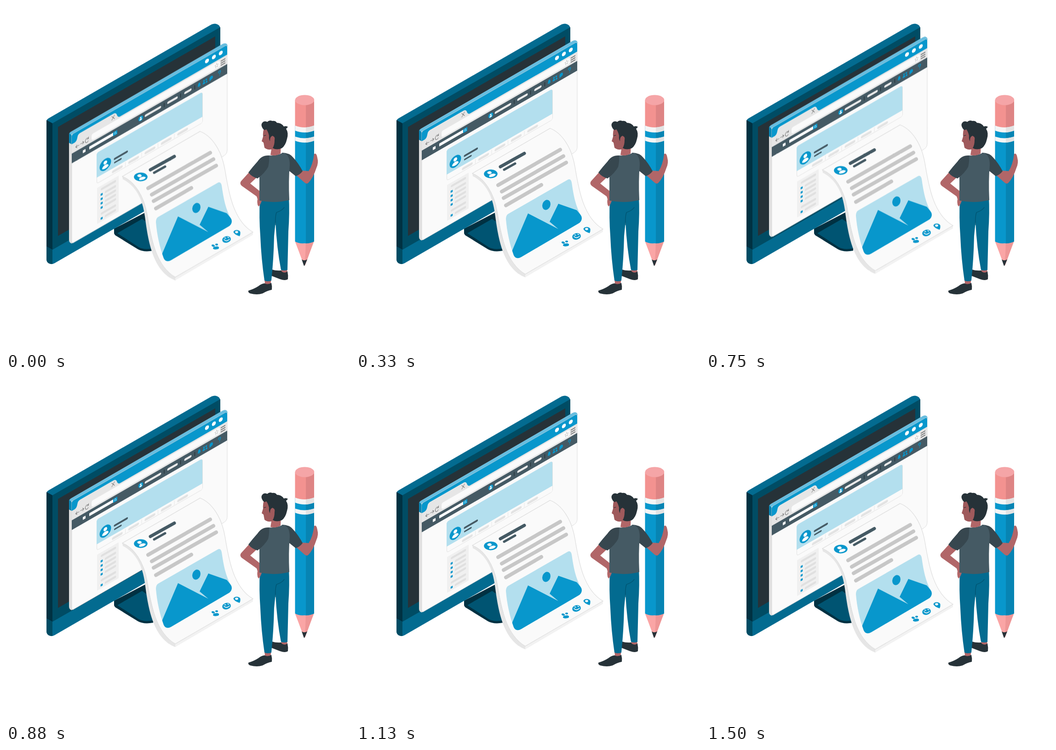
Recreate the animation shown at these times as an HTML page. Size 748 by 748 pixels, loop 1540 ms.

```html
<!DOCTYPE html>
<html lang="en">
<head>
<meta charset="utf-8">
<title>Post editor</title>
<style>
html, body { margin: 0; width: 100%; height: 100%; overflow: hidden; background: #fff; }
svg { display: block; width: 100vw; height: 100vh; }
.float { animation: float 1540ms linear infinite; }
@keyframes float {
  0%, 100% { transform: translateY(-.4px); }
  47.3% { transform: translateY(-15px); }
  96.6% { transform: translateY(0); }
}
.ln { fill: none; stroke-linecap: round; stroke-linejoin: round; }
.blue { fill: #0897cc; }
.sky { fill: #b3dfee; }
.teal { fill: #036b90; }
.ink { fill: #263238; }
.skin { fill: #b16668; }
.shade { fill: #9f5a5c; }
</style>
</head>
<body>
<svg viewBox="0 0 748 748">
  <defs>
    <g id="user">
      <circle class="blue" r="12.5"/>
      <circle cy="-4.2" r="4" fill="#fff"/>
      <path d="M-7 6.5C-7 -1 7 -1 7 6.5Q0 11.5 -7 6.5Z" fill="#fff"/>
    </g>
    <clipPath id="photo">
      <path d="M331 459L460 385Q467 381 469 391C473 418 477 442 490 464Q493 472 486 478.500L359 553Q348 559 343 549C334 524 328 497 326 470Q326 462 331 459Z"/>
    </clipPath>
  </defs>

  <!-- monitor -->
  <g>
    <path d="M235 484V494Q236 498 240 500L287 529Q300 536 320 532V440Z" fill="#003142"/>
    <path d="M242 494L296 463L320 480V527Q300 531 288 524Z" fill="#005472"/>
    <path class="teal" d="M88 250Q89 246 93 244L447 40Q456 36 463 42Q466 45 466 51V351L106 559Q97 564 91 558Q88 555 88 549Z"/>
    <path d="M101 255L466 46V321L101 530Z" fill="#004c64"/>
    <path d="M88 248L101 255V530L88 523Z" fill="#003142"/>
    <path d="M88 523L101 530V561Q88 561 88 550Z" fill="#004c64"/>
    <path class="ink" d="M113 263L455 66V303L113 500Z"/>
  </g>

  <g class="float">
    <!-- window -->
    <path d="M137 281Q137 276 141 274L471 83Q478 79 481 84L481 90L143 285V517Q137 515 137 509Z" fill="#e0e0e0"/>
    <path d="M137 298V280Q137 276 141 274L143 280V301Z" fill="#0784b3"/>
    <path d="M138 277L141 274L470 83.500Q477 79.500 481 84L482 88L143 282Z" fill="#67bddf"/>
    <g transform="matrix(1 -.577 0 1 143 280)">
      <path d="M0 0H334Q338 0 338 6V229Q338 237 330 237H4Q0 237 0 233Z" fill="#fafafa" stroke="#dcdcdc"/>
      <path class="blue" d="M0 22V4Q0 0 4 0H334Q338 0 338 6V22Z"/>
      <path d="M0 42V21H7Q11 20 12 14Q13 7 18 7H91Q96 7 98 13Q100 21 105 21H338V42Z" fill="#e6e6e6"/>
      <g fill="#fff">
        <circle cx="294" cy="9.500" r="4.300"/><circle cx="309" cy="9.500" r="4.300"/><circle cx="324" cy="9.500" r="4.300"/>
        <rect x="43" y="24" width="279" height="14" rx="4" fill="#fafafa"/>
      </g>
      <g class="ln" stroke="#757575" stroke-width="1">
        <path d="M87 11L93 19M93 11L87 19M16 32H8.500M11.500 29L8.500 32L11.500 35M19 31.500H26.500M23.500 28.500L26.500 31.500L23.500 34.500"/>
        <path d="M36 29A3.600 4.600 0 1 0 36 34M36.500 26V29.500H33"/>
        <path d="M324 27.500H334M324 32H334M324 36.500H334" stroke-width="2" stroke-linecap="butt"/>
        <path d="M315 26.500L316.200 30H319L316.800 32L317.600 35.500L315 33.500L312.400 35.500L313.200 32L311 30H313.800Z" stroke="#c4c4c4" stroke-width=".8"/>
      </g>

      <rect y="41.500" width="338" height="21" fill="#455a64"/>
      <rect x="24" y="48.500" width="6" height="6" rx=".6" fill="#fff"/>
      <rect x="38" y="48" width="53" height="6.500" rx="1" fill="#fff"/>
      <rect class="blue" x="90" y="47" width="9" height="8.500" rx="1"/>
      <path class="ln" d="M93 51A1.600 1.600 0 1 1 96 51A1.600 1.600 0 1 1 93 51M96 52L97 53.500" stroke="#cbe8f3" stroke-width=".8"/>
      <use href="#user" transform="translate(150 51.500) scale(.42)"/>
      <path class="ln" d="M161 51.500H192M210 51.500H228M247 51.500H258" stroke="#ebebeb" stroke-width="5"/>
      <path d="M201 47V56M236.500 47V56M267.500 47V56" stroke="#263238" stroke-width="1.300"/>
      <g class="blue">
        <path d="M277 46.500Q280 48 279.500 52L280.500 54.500H273.500L274.500 52Q274 48 277 46.500ZM276 55H278.500L277 57Z"/>
        <circle cx="287.500" cy="49" r="1.900"/><circle cx="292.500" cy="49" r="1.900"/>
        <path d="M284.500 55Q285 51 288 51.500Q290.500 52 290 56H285ZM291 56Q291 51.500 293.500 52Q295.500 53 295 56Z"/>
        <path d="M303 47.500Q307 47.500 307 51.500Q307 55.500 303 55.500L299.500 57V51.500Q299.500 47.500 303 47.500Z"/>
      </g>
      <path class="ln" d="M319 50Q319 47 321.500 47Q324 47 323.500 49.500Q323 51 321.500 52.500V53.500M321.500 56.500V56.600" stroke="#0897cc" stroke-width="1.500"/>

      <rect x="54.500" y="72" width="230" height="66" rx="4" fill="#fafafa" stroke="#e3e3e3"/>
      <path class="sky" d="M54 125V76Q54 71 59 71H279Q284 71 284 76V125Z"/>
      <path d="M116.500 127V137M152 127V137M187.500 127V137M223 127V137" stroke="#e6e6e6"/>
      <path class="ln" d="M90 132.500H108M125.500 132.500H143.500M161 132.500H179M196.500 132.500H214.500M232 132.500H250" stroke="#e3e3e3" stroke-width="5.500"/>
      <use href="#user" x="73" y="107"/>
      <g class="ln" stroke="#455a64">
        <path d="M93.500 106.500H120" stroke-width="4.300"/><path d="M93.500 114.500H107" stroke-width="3.300"/>
      </g>

      <rect x="55" y="148" width="47" height="78" rx="1" fill="#f0f0f0"/>
      <path class="ln" d="M65.500 156H94M74 167H94M74 176.500H94M74 186H94M74 195.500H94M65.500 209H94M74 219H94" stroke="#e0e0e0" stroke-width="4.800"/>
      <path d="M65 165.200v4.600M65 174.700v4.600M65 184.200v4.600M65 193.700v4.600M65 217.200v4.600" stroke="#0897cc" stroke-width="4.500"/>
    </g>

    <!-- sheet -->
    <path d="M253 371L254 377C282 391 297 420 302 458C308 500 316 577 368 597V590C323 564 314 495 307 454C300 413 279 381 253 371Z" fill="#e6e6e6"/>
    <path d="M368 590L537 492V498L368 597Z" fill="#f2f2f2"/>
    <path d="M422 273C448 283 469 315 476 356C483 397 492 466 537 492L368 590C323 564 314 495 307 454C300 413 279 381 253 371Z" fill="#fafafa" stroke="#dedede" stroke-width="1.200"/>
    <g transform="matrix(.98 -.42 .66 .62 293 372)"><use href="#user"/></g>
    <g class="ln">
      <path d="M314 356.500L366 327.500" stroke="#455a64" stroke-width="7"/>
      <path d="M322 363L346 349.500" stroke="#455a64" stroke-width="5"/>
      <path d="M309 396.500L444 319.500M317 410.500L451 333.500M321 424.500L457 347.500M326 440.500L403 396" stroke="#c7c7c7" stroke-width="8"/>
    </g>
    <g clip-path="url(#photo)">
      <rect class="sky" x="320" y="375" width="180" height="190"/>
      <path class="blue" d="M334 554L340 538L374 458L440 492L421 476L440 437L480 451L500 475V570H334Z"/>
    </g>
    <ellipse class="blue" cx="414" cy="439.500" rx="8.600" ry="11.200" transform="rotate(20 414 439.500)"/>
    <g class="blue">
      <ellipse cx="450.500" cy="521.500" rx="3.600" ry="2.200" transform="rotate(15 450.500 521.500)"/>
      <ellipse cx="458" cy="519" rx="3" ry="2"/>
      <path d="M450 528Q450 524 455 523.500Q461 522 463 525Q464 528 460 529Q453 531 450 528Z"/>
      <ellipse cx="479.500" cy="508" rx="9.500" ry="7" transform="rotate(-14 479.500 508)"/>
      <path d="M508 501Q496 497 494.500 492Q495 488 501 487.500Q508 487.500 509.500 492Q510 497 508 501Z"/>
    </g>
    <ellipse cx="501.500" cy="492" rx="3.300" ry="2.400" fill="#fafafa"/>
    <path class="ln" d="M474 508Q479 514 486 507.500M475.500 504.500L478 505.500M482 503L484.500 504" stroke="#fafafa" stroke-width="1.600"/>
  </g>

  <!-- pencil -->
  <g>
    <path d="M628.500 512L648.500 565L669.500 512Z" fill="#faa5a5"/>
    <path d="M652 512L650 565L669.500 512Z" fill="#ee9696"/>
    <path class="ink" d="M643 551Q648 555 655 551L649.500 564Q648.500 566 647.500 564Z"/>
    <path class="blue" d="M628.500 260H670V512Q660 517 649 516Q636 517 628.500 512Z"/>
    <path d="M652 260H670V512Q662 516 652 516Z" fill="#0784b3"/>
    <path d="M628.500 204H670V262Q649 269 628.500 262Z" fill="#f39290"/>
    <path d="M652 204H670V262Q662 265 652 265.500Z" fill="#de8484"/>
    <ellipse cx="649.500" cy="204.500" rx="20.800" ry="11" fill="#f5a5a7"/>
    <path d="M628.500 260Q649 268 670 260V271Q649 279 628.500 271ZM628.500 284Q649 291 670 284V293Q649 301 628.500 293Z" fill="#f5f5f5"/>
    <path d="M652 264Q662 263 670 260V271Q662 274 652 275ZM652 287.500Q662 287 670 284V293Q662 296 652 297Z" fill="#e3e3e3"/>
  </g>

  <!-- person -->
  <g>
    <path class="ink" d="M578 573Q587 576 598 575L612 577Q614 586 613 594Q607 598 596 594L578 587Z"/>
    <path class="skin" d="M599 571H612L611 578Q605 582 599 577ZM562 593H577L575 606Q568 610 563 604Z"/>
    <path class="ink" d="M562 603Q569 607 577 602Q579 610 578 617Q568 619 558 625Q546 629 531 625Q526 623 527 619Q540 615 549 609Q555 604 562 603Z"/>
    <path class="teal" d="M552 420L615 414Q617 450 614 490L612 574Q605 576 598 574Q589 528 586 470L583 500Q582 550 577 597Q569 600 562 597Q555 550 553 500Q550 460 552 420Z"/>
    <path class="ln" d="M586 476Q585 459 588 449Q600 445 605 438" stroke="#00516d" stroke-width="1.200"/>

    <path class="skin" d="M630 367L645 358L658 359Q667 346 670 322Q675 318 677 330Q680 341 675 352Q668 374 657 385Q653 388 648 383Z"/>
    <path d="M600 319Q617 319 625 330Q636 342 645 359Q639 367 630 370L610 354Z" fill="#37474f"/>

    <path class="skin" d="M530 360L546 372L531 386L551 402Q558 405 557 414L556 424Q553 433 549 436Q545 430 547 420L545 414L514 392Q507 387 511 381Z"/>
    <path d="M572 325Q590 326 602 319Q617 322 617 345Q614 380 616 422Q583 430 551 423V371Q551 341 572 325Z" fill="#455a64"/>
    <path d="M572 325Q556 324 547 338Q537 349 527 362Q535 372 547 375Q563 363 570 350Q573 338 572 325Z" fill="#37474f"/>

    <path class="skin" d="M575 304L598 300L597 321Q586 327 575 324L577 312Z"/>
    <path class="shade" d="M562 263Q558 273 559 284L556 294L560 297L562 308Q567 313 576 312Q586 309 587 296L586 266Z"/>
    <path class="ink" d="M558 266Q553 258 558 253Q562 249 568 252Q573 247 579 250Q586 249 589 254Q599 254 604 262Q610 260 613 263L609 267Q615 276 611 289Q608 303 600 309Q589 314 580 309Q584 302 584 292L580 282Q574 283 574 294Q571 289 572 282Q570 273 566 268Q562 272 558 266Z"/>
    <ellipse class="shade" cx="579.500" cy="289.500" rx="4.800" ry="6.500" transform="rotate(15 579.500 289.500)"/>
    <path class="ln" d="M561 282L565 281" stroke="#263238" stroke-width="1.200"/>
  </g>
</svg>
</body>
</html>
```
